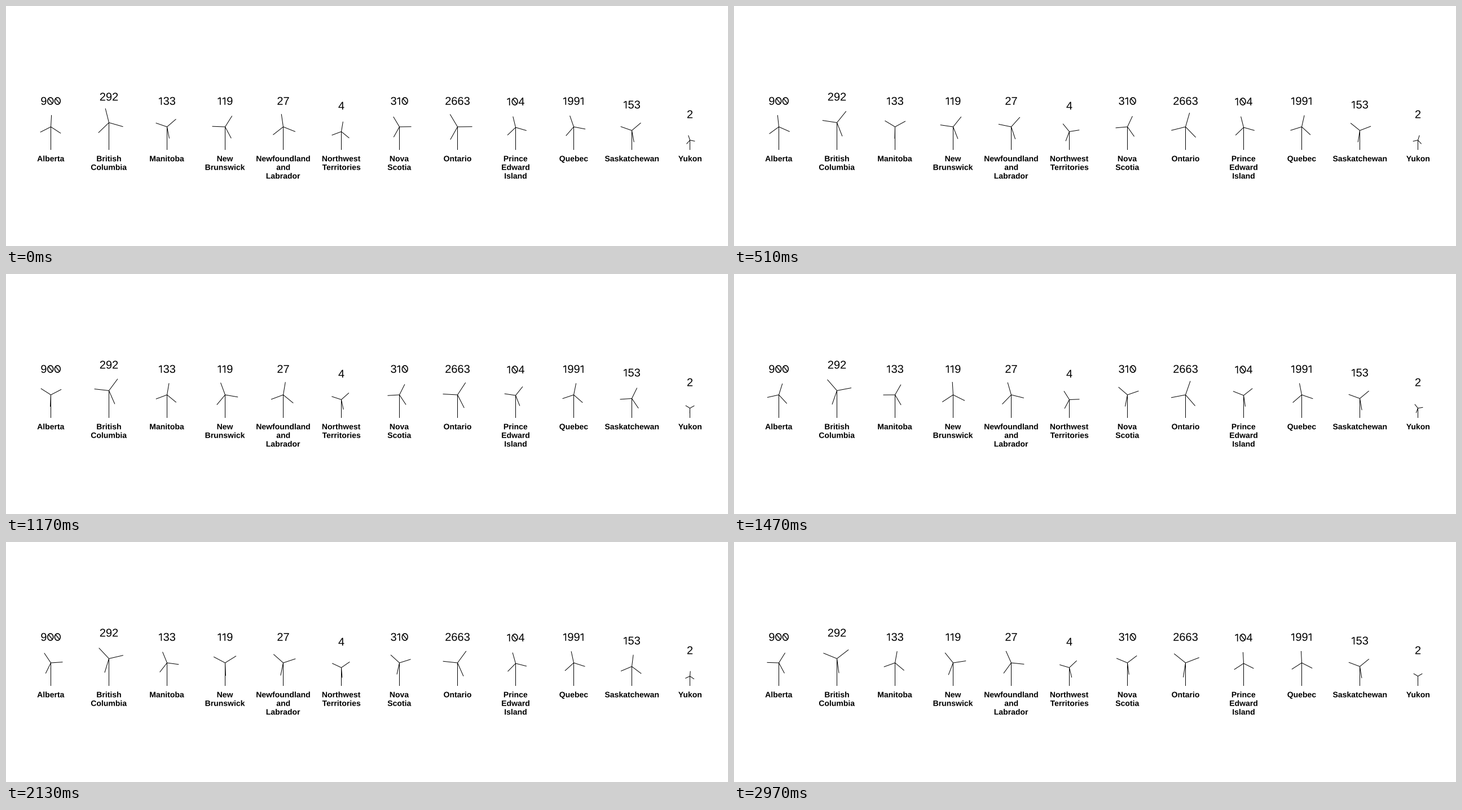
Animation, 1280 px wide and 427 px high, one loop 3 s. Source, as a matplotlib script:

```python
import numpy as np
import matplotlib.pyplot as plt
from matplotlib.animation import FuncAnimation
from matplotlib.collections import LineCollection
from matplotlib.patches import PathPatch
from matplotlib.path import Path
from matplotlib.textpath import TextPath

WIDTH, HEIGHT, DPI = 1280, 427, 64
PX = 72 / DPI  # points per pixel
FRAMES, INTERVAL = 100, 30

GROUND = 256
FIRST_X, SPACING = 79.5, 103
LABEL_BASELINE, LINE_HEIGHT = 276.3, 15.4
COUNT_LIFT = 39.2

# label, count, hub height on stage, blade length, starting angle
TURBINES = [
    ("Alberta", 900, 215, 21, 3.1),
    ("British\nColumbia", 292, 207.5, 26, 106.0),
    ("Manitoba", 133, 215, 21, 49.1),
    ("New\nBrunswick", 119, 215, 23, 32.1),
    ("Newfoundland\nand\nLabrador", 27, 215, 23, 111.8),
    ("Northwest\nTerritories", 4, 223.5, 18, 9.4),
    ("Nova\nScotia", 310, 215, 21, 89.2),
    ("Ontario", 2663, 215, 26, 89.3),
    ("Prince\nEdward\nIsland", 104, 216, 20, 106.3),
    ("Quebec", 1991, 215, 21, 100.9),
    ("Saskatchewan", 153, 221.5, 21, 49.5),
    ("Yukon", 2, 238.7, 9, 101.7),
]

fig = plt.figure(figsize=(WIDTH / DPI, HEIGHT / DPI), dpi=DPI, facecolor="white")
ax = fig.add_axes([0, 0, 1, 1])
ax.set(xlim=(0, WIDTH), ylim=(HEIGHT, 0))
ax.axis("off")


def draw_text(x, y, text, size, weight="normal"):
    """Text centred on x with its baseline at y, at subpixel precision."""
    font = {"family": "Liberation Sans", "weight": weight}
    outline = TextPath((0, 0), text, size=size, prop=font)
    box = outline.get_extents()
    shift = [x - (box.x0 + box.x1) / 2, y]
    path = Path(outline.vertices * [1, -1] + shift, outline.codes)
    ax.add_patch(PathPatch(path, facecolor="black", lw=0, snap=False))


def stroke(xs, ys, width=1.6):
    ax.plot(xs, ys, color="black", lw=width * PX, solid_capstyle="butt",
            solid_joinstyle="miter", snap=False)


def draw_zero(x, y):
    """Wide zero with a backward slash."""
    turn = np.linspace(0, 2 * np.pi, 60)
    cx, cy = x + 6.3, y - 6.8
    stroke(cx + 4.9 * np.cos(turn), cy + 6.1 * np.sin(turn))
    stroke([cx - 3.7, cx + 3.7], [cy - 4.6, cy + 4.6], 1.4)


def draw_one(x, y):
    """Footless one: flag and stem."""
    stroke([x + 0.9, x + 5.2, x + 5.2], [y - 10.4, y - 12.8, y])


def draw_digit(x, y, digit):
    draw_text(x + 5.56, y, digit, 20)


GLYPHS = {"0": (draw_zero, 12.6), "1": (draw_one, 8.3)}


def draw_count(x, y, count):
    digits = str(count)
    glyphs = [GLYPHS.get(d, (lambda gx, gy, d=d: draw_digit(gx, gy, d), 11.12))
              for d in digits]
    x -= sum(advance for _, advance in glyphs) / 2
    for draw, advance in glyphs:
        draw(x, y)
        x += advance


def draw_label(x, label):
    for row, line in enumerate(label.split("\n")):
        draw_text(x, LABEL_BASELINE + row * LINE_HEIGHT, line, 14, "bold")


hubs = np.array([(FIRST_X + SPACING * i, t[2]) for i, t in enumerate(TURBINES)])
lengths = np.array([t[3] for t in TURBINES])
starts = np.radians([t[4] for t in TURBINES])
speeds = 0.1 * np.log([t[1] for t in TURBINES])  # radians per step

for (x, y), (label, count, *_) in zip(hubs, TURBINES):
    draw_count(x, y - COUNT_LIFT, count)
    draw_label(x, label)
    stroke([x, x], [y, GROUND], 1)

blades = LineCollection([], colors="black", linewidths=PX, capstyle="butt",
                        snap=False)
ax.add_collection(blades, autolim=False)


def update(frame):
    step = (frame + 1) // 2
    angles = starts + speeds * step
    segments = []
    for k in range(3):
        a = angles + k * 2 * np.pi / 3
        tips = hubs + lengths[:, None] * np.column_stack([np.sin(a), -np.cos(a)])
        segments.extend(np.stack([hubs, tips], axis=1))
    blades.set_segments(segments)
    return [blades]


anim = FuncAnimation(fig, update, frames=FRAMES, interval=INTERVAL,
                     repeat=True, repeat_delay=0, blit=False)
plt.show()
```
